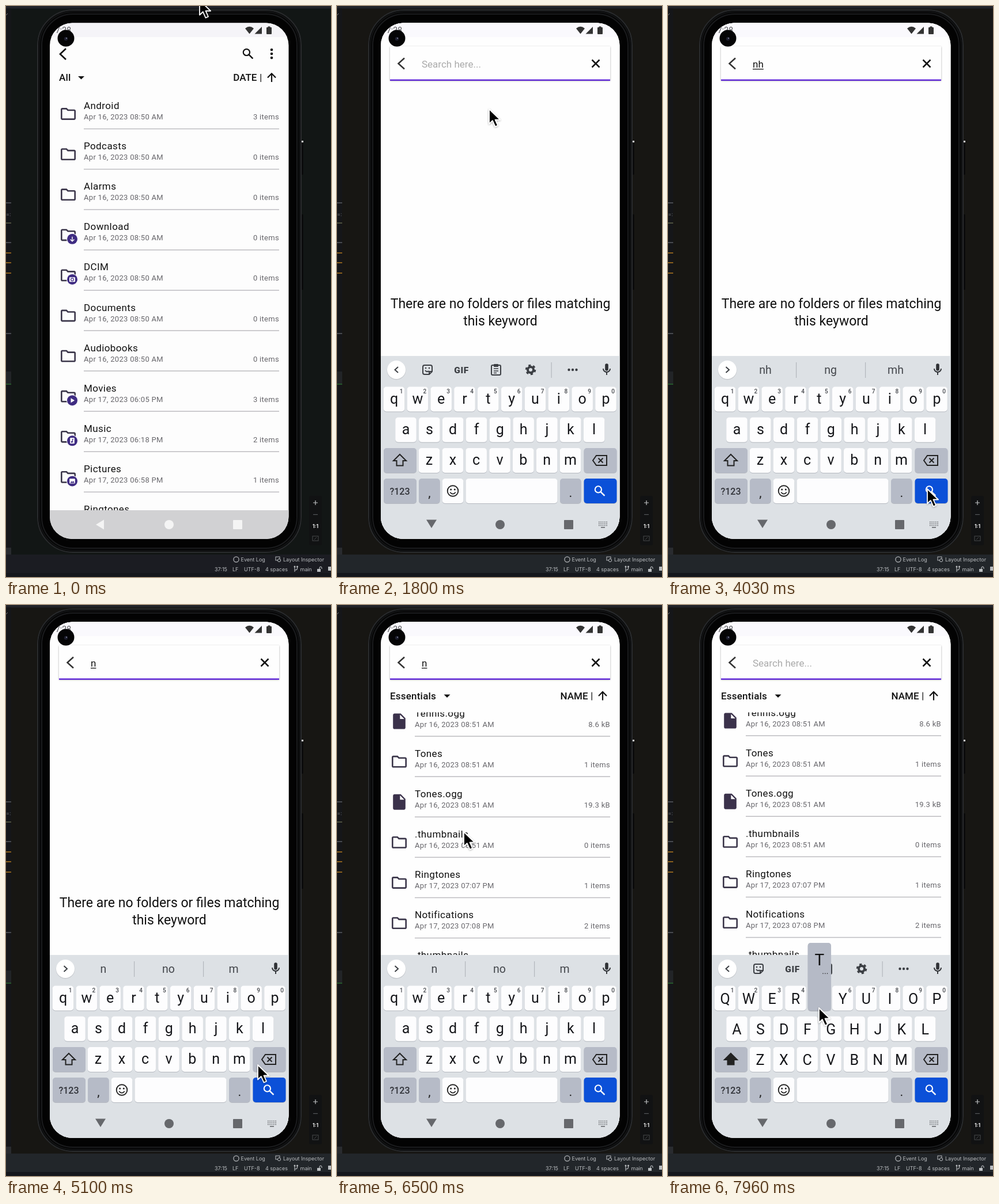
Recreate the animation shown at these times as an HTML page. Size 564 by 992 pixels, loop 8000 ms.

```html
<!DOCTYPE html>
<html lang="en">
<head>
<meta charset="utf-8">
<title>File search</title>
<style>
  html, body { margin: 0; width: 100%; height: 100%; overflow: hidden; background: #161613; }
  svg { display: block; width: 100%; height: 100%; }
  text { font-family: Roboto, sans-serif; white-space: pre; }
  .ide text { font-family: Inter, sans-serif; font-size: 9px; fill: #b9bcbf; }
  .name { font-size: 17px; letter-spacing: .4px; fill: #111; }
  .meta { font-size: 13px; letter-spacing: .3px; fill: #66656a; }
  .head { font-size: 17px; font-weight: 500; fill: #111; }
  .line { fill: none; stroke-linecap: butt; }
  .mid { text-anchor: middle; }
  .end { text-anchor: end; }
</style>
</head>
<body>
<svg id="stage" viewBox="0 0 564 992" xmlns="http://www.w3.org/2000/svg"></svg>
<script>
const LOOP = 8000, PITCH = 70.1;

// Markup helpers
const rect = (x, y, w, h, fill, r = 0, more = '') =>
  `<rect x="${x}" y="${y}" width="${w}" height="${h}" rx="${r}" fill="${fill}" ${more}/>`;
const circle = (x, y, r, fill, more = '') => `<circle cx="${x}" cy="${y}" r="${r}" fill="${fill}" ${more}/>`;
const shape = (d, fill, more = '') => `<path d="${d}" fill="${fill}" ${more}/>`;
const line = (d, color, w, more = '') => `<path class="line" d="${d}" stroke="${color}" stroke-width="${w}" ${more}/>`;
const text = (x, y, s, cls = '', more = '') => `<text x="${x}" y="${y}" class="${cls}" ${more}>${s}</text>`;
const group = (id, body, more = '') => `<g id="${id}" ${more}>${body}</g>`;
const at = (x, y, body, scale = 1) => `<g transform="translate(${x} ${y}) scale(${scale})">${body}</g>`;

// Icons centred on the origin
const magnifier = (c, w) => circle(-2.6, -2.6, 5.6, 'none', `stroke="${c}" stroke-width="${w}"`) + line('M1.6 1.6L8.4 8.4', c, w + .3);
const folder = at(-15.6, -15.6, shape('M9.17 6l2 2H20v10H4V6h5.17M10 4H4c-1.1 0-2 .9-2 2v12c0 1.1.9 2 2 2h16c1.1 0 2-.9 2-2V8c0-1.1-.9-2-2-2h-8z', '#3b364a'), 1.3);
const file = at(-16.2, -16.2, shape('M6 2c-1.1 0-2 .9-2 2v16c0 1.1.9 2 2 2h12c1.1 0 2-.9 2-2V8l-6-6zm7 7V3.5L18.5 9z', '#3b324b'), 1.35);
const mic = shape('M-2.8-7a2.8 2.8 0 0 1 5.6 0V0a2.8 2.8 0 0 1-5.6 0z', '#303236') +
  line('M-6-1a6 6 0 0 0 12 0M0 5v5', '#303236', 1.9);
const smile = circle(0, 0, 9.3, 'none', 'stroke="#222" stroke-width="1.9"') + circle(-3.3, -2.6, 1.5, '#222') +
  circle(3.3, -2.6, 1.5, '#222') + line('M-4.8 2.2q4.8 6 9.6 0', '#222', 1.8);
const upArrow = line('M0 8V-6.5M-7 .5L0-6.7L7 .5', '#111', 2.2);
const badges = {
  down: line('M0-4V4M-3.4.7L0 4L3.4.7', '#fff', 1.4),
  camera: rect(-5, -3.6, 10, 8, '#fff', 1) + circle(0, .4, 2.4, '#fff', 'stroke="#3f2c82" stroke-width="1.2"'),
  play: shape('M-2.5-4L4 0L-2.5 4z', '#fff'),
  note: rect(-3.8, -5, 7.6, 10, '#fff', 1) + line('M.3-3V2M0-2.4h2', '#3f2c82', 1.2) + circle(-.7, 2, 1.5, '#3f2c82'),
  image: rect(-4.8, -4.2, 9.6, 8.4, '#fff', 1) + shape('M-3.6 3L-1.3 0L.3 1.6L1.8-.3L3.8 3z', '#3f2c82'),
};

// Rows of the file lists; y is the divider line
function row(y, [name, info, date, kind = 'folder']) {
  const badge = badges[kind] ? at(115, y - 19, circle(0, 0, 10, '#fff') + circle(0, 0, 9, '#3f2c82') + badges[kind]) : '';
  return at(108, y - 26, kind === 'file' ? file : folder) + badge +
    text(135, y - 34.5, name, 'name') + text(135, y - 16.5, date, 'meta') + text(474, y - 16.5, info, 'meta end') +
    rect(135, y - .8, 339, 1.5, '#bdbcc0');
}
const list = (rows, first) => rows.map((r, i) => row(first + PITCH * i, r)).join('');
const day16 = 'Apr 16, 2023 08:5', early = day16 + '0 AM', later = day16 + '1 AM';
const day17 = time => `Apr 17, 2023 ${time} PM`;

const home = [
  ['Android', '3 items', early], ['Podcasts', '0 items', early], ['Alarms', '0 items', early],
  ['Download', '0 items', early, 'down'], ['DCIM', '0 items', early, 'camera'],
  ['Documents', '0 items', early], ['Audiobooks', '0 items', early],
  ['Movies', '3 items', day17('06:05'), 'play'], ['Music', '2 items', day17('06:18'), 'note'],
  ['Pictures', '1 items', day17('06:58'), 'image'], ['Ringtones', '1 items', day17('07:07')],
];
const found = [
  ['Android', '3 items', early], ['Documents', '0 items', early], ['Download', '0 items', early],
  ['Morning', '1 items', later], ['Morning.ogg', '14.2 kB', later, 'file'], ['Rain.ogg', '12.7 kB', later, 'file'],
  ['Spinny_hop', '1 items', later], ['Spinny Hop.ogg', '11.0 kB', later, 'file'],
  ['Snap', '1 items', later], ['Sunlit.ogg', '9.5 kB', later, 'file'],
  ['Tennis', '1 items', later], ['Tennis.ogg', '8.6 kB', later, 'file'],
  ['Tones', '1 items', later], ['Tones.ogg', '19.3 kB', later, 'file'],
  ['.thumbnails', '0 items', later], ['Ringtones', '1 items', day17('07:07')],
  ['Notifications', '2 items', day17('07:08')], ['.thumbnails', '0 items', day17('07:08')],
];

const header = (y, label, caretX, sort) =>
  text(92, y + 6, label, 'head', 'letter-spacing=".2"') + shape(`M${caretX - 5.5} ${y - 2}h11l-5.5 5.5z`, '#111') +
  text(435.5, y + 6, sort, 'head end') + rect(441.5, y - 6, 1.5, 14, '#333') + at(461, y, upArrow);

const homePage = rect(76, 29, 415, 900, '#fdfdfd') + rect(76, 29, 415, 25, '#f5f4f8') +
  line('M104 74L94 83.5L104 93', '#111', 2.7) + at(420, 83, magnifier('#111', 2.2)) +
  [-7, 0, 7].map(d => circle(461, 83 + d, 2.3, '#111')).join('') +
  header(124, 'All', 130.5, 'DATE') + list(home, 213.5);

const searchPage = rect(76, 29, 415, 900, '#fefefe') + rect(76, 29, 415, 25, '#faf9fd') +
  group('empty', ['There are no folders or files matching', 'this keyword'].map((s, i) =>
    text(283.5, 525 + 30 * i, s, 'mid', 'font-size="23" fill="#111"')).join('')) +
  group('results', `<g clip-path="url(#listArea)">${group('rows', list(found, 246))}</g>` + header(157.5, 'Essentials', 191, 'NAME')) +
  rect(92, 70, 382, 59, '#fefefe', 1, 'filter="url(#soft)"') + rect(92, 127.6, 382, 2.2, '#5316d6') +
  line('M117 90.5L106.5 100L117 109.5', '#333', 2.5) + line('M442.5 93.5l13 13M455.5 93.5l-13 13', '#111', 2.5) +
  text(147, 107, 'Search here...', '', 'id="hint" font-size="17" fill="#aaa"') +
  text(147, 107, '', '', 'id="typed" font-size="17" fill="#111"') + rect(147, 109, 9.5, 1.3, '#111', 0, 'id="underline"');

// Keyboard
const KEY = 40.83, letters = ['qwertyuiop', 'asdfghjkl', 'zxcvbnm'];
const rowX = [99, 119.5, 160], rowY = [661.5, 714.8, 768];
const keyPlace = ch => {
  const r = letters.findIndex(s => s.includes(ch));
  return [rowX[r] + KEY * letters[r].indexOf(ch), rowY[r]];
};
const key = (x, y, w, fill, more = '') => rect(x, y + 1, w, 43, '#b5b9c0', 5) + rect(x, y, w, 43, fill, 5, more);
const eachLetter = fn => letters.flatMap(s => [...s]).map(ch => fn(ch, ...keyPlace(ch))).join('');
const glyphs = upper => eachLetter((ch, x, y) =>
  text(x, y + (upper ? 31 : 29), upper ? ch.toUpperCase() : ch, 'mid', 'font-size="25" fill="#15161a"'));
const divider = x => rect(x, 619, 1.2, 27, '#b3b7bd');
const GREY = '#b6bbc7', INK = '#3c3f44';

const toolbar = line('M106 627L100.5 632L106 637', INK, 2) +
  at(157, 632, line('M-8-5q0-3 3-3h10q3 0 3 3v8l-5 5h-8q-3 0-3-3zM8 3h-5v5M-4 1q3 4 6 1', INK, 2) + circle(-3, -3, 1.3, INK) + circle(3, -3, 1.3, INK)) +
  text(216, 637.5, 'GIF', 'mid', `font-size="15.5" font-weight="800" letter-spacing=".6" fill="${INK}"`) +
  at(276, 632, rect(-8, -8, 16, 17, 'none', 2, `stroke="${INK}" stroke-width="2"`) + rect(-4, -10, 8, 5, INK, 1) + line('M-4-2h8M-4 2h8M-4 5.5h5', INK, 1.6)) +
  at(336, 632, circle(0, 0, 5, 'none', `stroke="${INK}" stroke-width="4"`) + circle(0, 0, 7.8, 'none', `stroke="${INK}" stroke-width="3" stroke-dasharray="4.1 4.07"`)) +
  divider(371.5) + [-6.5, 0, 6.5].map(d => circle(409 + d, 632, 2.2, INK)).join('');
const suggestions = line('M100.5 627L106 632L100.5 637', INK, 2) + divider(222) + divider(342) +
  [169, 282, 395].map((x, i) => text(x, 639, '', 'mid', `id="word${i}" font-size="19.5" fill="#44474c"`)).join('');

const keyboard = rect(76, 608, 415, 330, '#dde1e5', 0, 'id="board"') + circle(103, 633, 16.4, '#c6c9ce') + circle(103, 632, 16, '#fff') +
  group('toolbar', toolbar) + group('words', suggestions) + at(468, 631, mic) +
  eachLetter((ch, x, y) => key(x - 18.3, y, 36.6, '#fdfdfe')) +
  [...'1234567890'].map((d, i) => text(rowX[0] + 12.5 + KEY * i, 673, d, 'mid', 'font-size="10" font-weight="500" fill="#44474c"')).join('') +
  group('lower', glyphs(false)) + group('upper', glyphs(true)) +
  key(81, 768, 57, GREY) + shape('M109 779l11 11h-5.5v8.5h-11V790H98z', 'none', 'id="shift" stroke="#222" stroke-width="2"') +
  key(428.5, 768, 57, GREY, 'id="erase"') +
  at(456, 789.5, line('M-12 0L-6-8.5H12V8.5H-6zM-2.5-4l8 8M5.5-4l-8 8', '#222', 2)) +
  key(81, 821, 57, GREY) + text(109, 849, '?123', 'mid', 'font-size="16" font-weight="500" fill="#303238"') +
  key(142, 821, 36.6, GREY) + text(160.5, 853, ',', 'mid', 'font-size="22" fill="#222"') +
  key(182.7, 821, 36.6, '#fdfdfe') + at(201, 842.5, smile) + key(223.5, 821, 159, '#fdfdfe') +
  key(387, 821, 36.6, GREY) + text(405.5, 853, '.', 'mid', 'font-size="22" fill="#222"') +
  key(428.5, 821, 57, '#0b50d8', 'id="go"') + at(456, 842.5, magnifier('#fff', 2.1));

const popup = rect(-20.2, 0, 40.4, 119, '#8d929c', 5, 'opacity=".5"') + rect(-20.2, 0, 40.4, 117.5, '#b5bac6', 5) +
  text(0, 39, '', 'mid', 'id="popupText" font-size="28" fill="#111"') + text(10, 54, '...', 'mid', 'id="popupDots" font-size="14" fill="#222"');

const navShapes = c => circle(283, 901, 8, c) + rect(394, 893, 16, 16, c, 1);
const navLight = shape('M156 901l14-8.5v17z', '#f4f4f4') + navShapes('#f4f4f4');
const navDark = shape('M155 892.5h18l-9 14.5z', '#66686c') + navShapes('#66686c') +
  [0, 1, 2].map(r => line(`M454 ${896.5 + 3 * r}h15`, '#66686c', 1.7, 'stroke-dasharray="1.7 1.6"')).join('') + rect(458, 905, 7, 1.6, '#66686c');

const statusBar = text(86, 47, '7:28', '', 'font-size="14" fill="#55565a"') +
  shape('M415 39q7.5-6.5 15 0l-7.5 9.5z', '#333') + shape('M444 36v12.5h-12.5z', '#333') + rect(452, 37, 9, 12, '#333', 1) + rect(454.5, 35.5, 4, 2, '#333');

// Editor window around the phone
const marks = [[342, '#55585c'], [377, '#5c6046'], [411, '#55585c'], [429, '#a8731d'], [446, '#a8731d'], [464, '#a8731d'], [569, '#55585c'], [657, '#28652c']];
const editor = rect(0, 0, 564, 992, '#171613', 0, 'id="back"') + rect(0, 0, 564, 4.5, '#212329') +
  rect(0, 4, 9, 946, '#151619') + rect(0, 635, 9, 22, '#222427') + rect(0, 941, 9, 12, '#292b2f') +
  marks.map(([y, c]) => rect(0, y - .8, 9, 1.6, c)).join('') + text(0, 365, '=:', '', 'opacity=".5"') + line('M0 16l3-3', '#777', 1) +
  rect(0, 953, 564, 32, '#22262a', 0, 'id="bar"') + rect(0, 985, 564, 7, '#15171c') +
  rect(526, 851, 22, 86, '#111213', 3) + line('M533 863h8M537 859v8', '#c4c6c8', 1.2) + line('M533 883.5h8', '#55585a', 1.2) +
  text(537, 907, '1:1', 'mid', 'font-weight="700" style="fill:#eee;font-size:8.5px"') +
  rect(532, 921, 10, 8, 'none', 0, 'stroke="#484a4c"') + line('M535 927l4-4', '#484a4c', 1) +
  circle(399.5, 961.5, 4.6, 'none', 'stroke="#b9bcbf" stroke-width="1.2"') + text(407.5, 965, 'Event Log') +
  rect(468, 957, 7, 6, 'none', 0, 'stroke="#b9bcbf"') + circle(474, 963, 2.6, '#22262a', 'stroke="#b9bcbf"') + text(481, 965, 'Layout Inspector') +
  [[362, '37:15'], [393, 'LF'], [413, 'UTF-8'], [450, '4 spaces'], [510.5, 'main']].map(([x, s]) => text(x, 982, s)).join('') +
  line('M501 975v8M505.5 975v2q0 3-4.5 3', '#b9bcbf', 1.1) + circle(501, 974, 1.5, '#b9bcbf') + circle(505.5, 974, 1.5, '#b9bcbf') +
  rect(540, 978, 6, 5, '#b9bcbf') + line('M544 978v-2q2-4 4 0v2', '#b9bcbf', 1.1) + rect(559, 974, 6, 7, '#b9bcbf');

const ring = (inset, color, w) => rect(54 + inset, 6 + inset, 459 - 2 * inset, 944 - 2 * inset, 'none', 62 - inset, `stroke="${color}" stroke-width="${w}"`);
const phone = rect(512, 234, 4, 59, '#0b0b0c', 1) + rect(513, 234, 3, 3, '#ddd') + rect(512, 362, 4, 131, '#0b0b0c', 1) +
  rect(54, 6, 459, 944, '#030303', 62) + ring(1, '#2a2c2e', 2) + ring(4, '#101112', 3) + ring(8, '#1b1c1e', 2);

const arrow = shape('M0 0V25.5L5.8 20L10.5 30.5L15 28.5L10.5 18.5H19z', '#050505', 'stroke="#fff" stroke-width="1.8" stroke-linejoin="round" filter="url(#soft)"');

document.getElementById('stage').innerHTML = `<defs>
  <clipPath id="screen">${rect(76, 29.5, 414.5, 896.5, '#fff', 39)}</clipPath>
  <clipPath id="listArea">${rect(76, 186.5, 415, 740, '#fff')}</clipPath>
  <filter id="soft" x="-20%" y="-20%" width="140%" height="150%"><feDropShadow dx="0" dy="1" stdDeviation="1.6" flood-opacity=".35"/></filter>
</defs>` + group('ide', editor, 'class="ide"') + phone +
  `<g clip-path="url(#screen)">` + homePage + group('search', searchPage) + statusBar +
  rect(76, 876, 415, 52, '#d1d1d3') + group('keyboard', keyboard) + group('navLight', navLight) + group('navDark', navDark) + '</g>' +
  group('popup', popup) + circle(104, 56, 14.5, '#050506') + circle(104, 57, 3.2, '#1c1d2c') + circle(105, 56, 1, '#8a8ba0') + group('cursor', arrow);

const el = Object.fromEntries([...document.querySelectorAll('[id]')].map(n => [n.id, n]));

// Motion
const clamp = v => Math.max(0, Math.min(1, v));
const ramp = (t, a, b) => clamp((t - a) / (b - a));
const smooth = u => u * u * (3 - 2 * u);
const within = (t, ...spans) => spans.some(([a, b]) => t >= a && t < b);
function track(points, t, ease = u => u) {
  const i = points.findIndex(p => p[0] > t);
  if (i < 1) return points[i < 0 ? points.length - 1 : 0].slice(1);
  const a = points[i - 1], b = points[i], u = ease(ramp(t, a[0], b[0]));
  return a.slice(1).map((v, k) => v + (b[k + 1] - v) * u);
}
const pointer = [
  [30, 336, -10], [660, 418, 80], [820, 418, 80], [1100, 263, 118], [1260, 258, 124], [1730, 258, 124],
  [2150, 340, 867], [2390, 362, 793], [2560, 362, 793], [2650, 326, 736], [2760, 326, 736], [3360, 449, 839],
  [3630, 450, 839], [4030, 450, 839], [4400, 175, 471], [4780, 452, 782], [4900, 452, 782], [5100, 437, 799],
  [5280, 453, 840], [5600, 453, 840], [5850, 245, 560], [6160, 233, 157], [6400, 221, 375], [6430, 221, 375],
  [6500, 220, 394], [6620, 220, 394], [6950, 452, 786], [7260, 452, 786], [7550, 370, 818], [7930, 262, 700],
];
const scroll = [[5860, 0], [5960, 90], [6160, 441], [6280, 665], [6400, 780], [6430, 780], [6500, 789], [6530, 790]];
const typing = [[7070, ''], [4890, 'n'], [2750, 'nh'], [2470, 'n'], [0, '']];
const popups = [['n', 2390, 2480], ['h', 2630, 2740], ['t', 7930, LOOP]];
const guesses = { n: ['n', 'no', 'm'], nh: ['nh', 'ng', 'mh'] };

const show = (node, on) => node.setAttribute('display', on ? 'inline' : 'none');
const move = (node, x, y) => node.setAttribute('transform', `translate(${x} ${y})`);
const fade = (node, v) => node.setAttribute('opacity', v);
const fill = (node, c) => node.setAttribute('fill', c);

function draw(t) {
  const value = typing.find(([from]) => t >= from)[1];
  const upper = t >= 7280, results = t >= 5420;
  fill(el.back, t < 330 ? '#121615' : '#171613');
  fill(el.bar, t < 330 ? '#1b1c22' : '#22262a');
  fade(el.search, ramp(t, 840, 960));

  const rise = smooth(ramp(t, 1041, 1212));
  move(el.keyboard, 0, 320 * (1 - rise));
  fade(el.keyboard, rise);
  fade(el.board, rise);
  fade(el.navLight, 1 - rise * rise);
  fade(el.navDark, rise * rise);

  show(el.results, results);
  show(el.empty, !results);
  move(el.rows, 0, -track(scroll, t)[0]);
  show(el.hint, !value);
  el.typed.textContent = value;
  el.underline.setAttribute('width', value.length * 9.4);
  show(el.toolbar, !value);
  show(el.words, value);
  (guesses[value] || []).forEach((w, i) => { el['word' + i].textContent = w; });

  show(el.lower, !upper);
  show(el.upper, upper);
  fill(el.shift, upper ? '#222' : 'none');
  fill(el.erase, within(t, [4800, 4890], [6980, 7080]) ? '#9da3b0' : GREY);
  fill(el.go, within(t, [3400, 3460], [5310, 5370]) ? '#3c75e6' : '#0b50d8');

  const pressed = popups.find(([, from, to]) => within(t, [from, to]));
  show(el.popup, pressed);
  if (pressed) {
    const [x, y] = keyPlace(pressed[0]);
    move(el.popup, x + .5, y - 74.5);
    el.popupText.textContent = upper ? pressed[0].toUpperCase() : pressed[0];
    show(el.popupDots, upper);
  }
  move(el.cursor, ...track(pointer, t, smooth));
}

// Thirty steps a second, on 10 ms marks: 0, 30, 60, 100, ...
const stepped = t => Math.floor(t / 100) * 100 + Math.min(2, Math.floor(t % 100 / 30)) * 30;

const start = performance.now();
function tick() {
  draw(stepped((performance.now() - start) % LOOP));
  requestAnimationFrame(tick);
}
tick();
</script>
</body>
</html>
```
